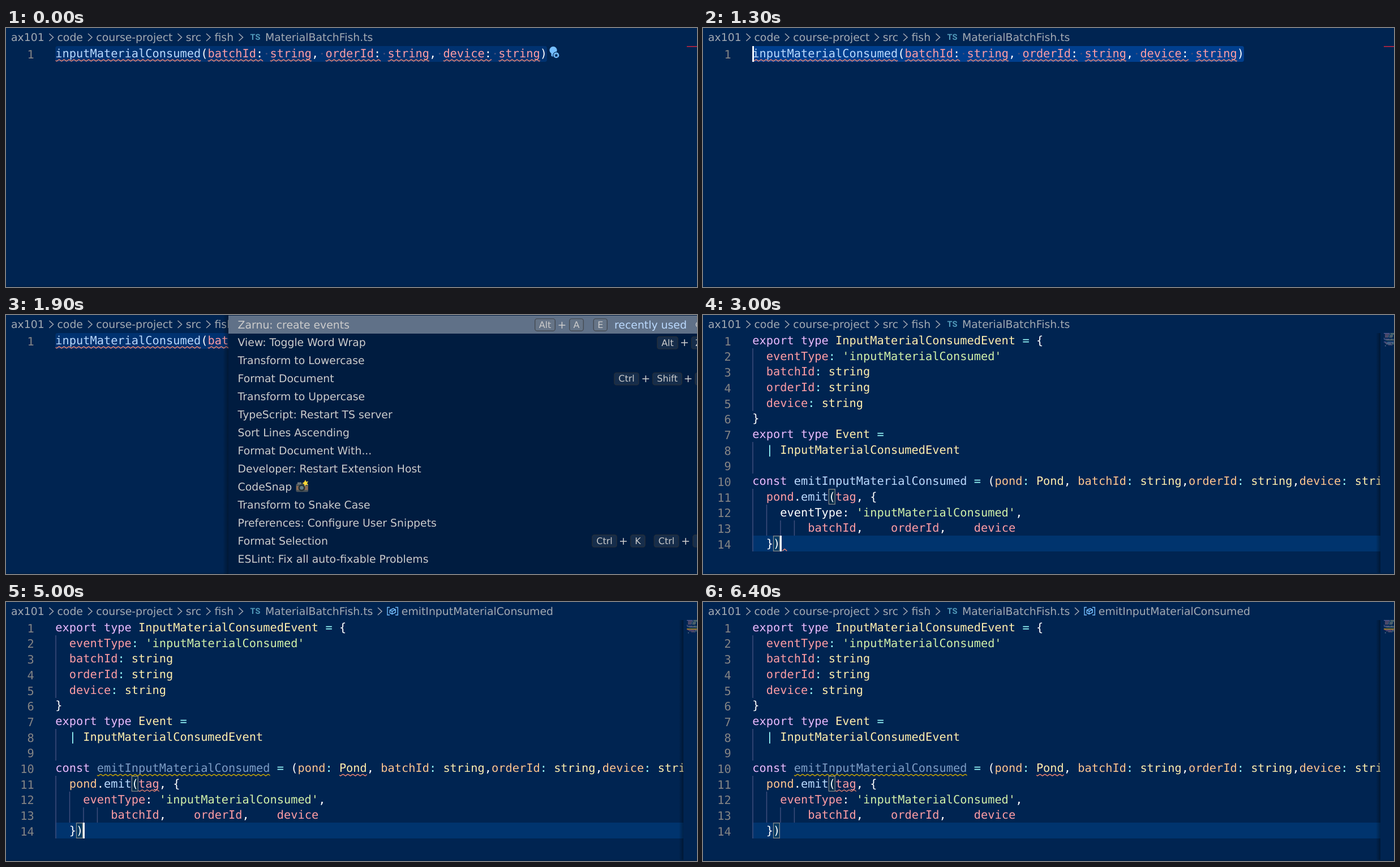
Write an HTML page that moves like this. It is 1221 px wide and 459 px high and loops after 6500 ms.

```html
<!DOCTYPE html>
<html lang="en">
<head>
<meta charset="utf-8">
<title>Editor command demo</title>
<style>
  html, body { margin: 0; width: 100%; height: 100%; overflow: hidden; background: #002451; }
  svg { display: block; }
  text { white-space: pre; text-rendering: geometricPrecision; }
  .code { font: 20.32px "DejaVu Sans Mono", monospace; }
  .ui { font: 18.85px "DejaVu Sans", sans-serif; }
  .key { font: 16px "DejaVu Sans", sans-serif; text-anchor: middle; }
  .file { font: bold 14.5px Roboto, sans-serif; }
</style>
</head>
<body>
<svg id="stage" width="1221" height="459" viewBox="0 0 1221 459"></svg>
<script>
const LOOP = 6500;
const LEFT = 87.3, TOP = 31.5, CHAR = 12.234, LINE = 27.69, BOX = 28;
const ERROR = '#f48771', WARNING = '#cca700', CRUMB = '#a3aab3';
const COLORS = {
  k: '#ebbbff', y: '#ffeead', o: '#99ffff', w: '#ffffff', r: '#ff9da4',
  s: '#d1f1a9', f: '#bbdaff', p: '#ffc58f', d: '#7d9dc5'
};

const colX = col => LEFT + col * CHAR;
const rowY = row => TOP + row * LINE;
const boxY = row => Math.round(rowY(row));
const rect = (x, y, w, h, fill, extra = '') =>
  `<rect x="${x}" y="${y}" width="${w}" height="${h}" fill="${fill}" ${extra}/>`;
const path = (d, stroke, width = 1.45, extra = '') =>
  `<path d="${d}" fill="none" stroke="${stroke}" stroke-width="${width}" ${extra}/>`;
const text = (x, y, str, fill, cls = 'ui', extra = '') =>
  `<text x="${x}" y="${y}" fill="${fill}" class="${cls}" ${extra}>${str}</text>`;

// A line is a list of tokens split by "~"; the first letter of each is its colour.
function tokens(line) {
  let col = 0;
  return line.split('~').filter(Boolean).map(part => {
    const str = part.slice(1);
    const token = { col: col + str.length - str.trimStart().length, str: str.trim(), fill: COLORS[part[0]] };
    col += str.length;
    return token;
  });
}

const codeLine = (line, row) =>
  tokens(line).map(t => text(colX(t.col), Math.round(rowY(row) + 20.5), t.str, t.fill, 'code')).join('');

const lineNumber = row =>
  text(49.8, Math.round(rowY(row) + 22.3), row + 1, '#858585', 'code', 'text-anchor="end"');

function squiggle(row, col, length, color) {
  const end = length * CHAR, y = rowY(row) + 23.8;
  let d = `M0 2.2L2.2 3.6`;
  for (let x = 2.2; x < end; x += 8.71) d += `L${x + 4.35} .6L${x + 8.71} 3.6`;
  return `<svg x="${colX(col)}" y="${y}" width="${end}" height="4.4">${path(d, color, 1.3)}</svg>`;
}

const bracket = (row, col) =>
  rect(colX(col) + .5, boxY(row) + .7, CHAR - 1.4, BOX - 1.4, 'rgba(0,100,0,.1)', 'stroke="#888" stroke-width="1.3"');
const caret = (row, col) => rect(colX(col) - .2, boxY(row), 2.9, BOX, '#fff');
const activeRow = row => rect(LEFT, boxY(row), 1197 - LEFT, BOX, '#00346e');

function breadcrumbs(symbol) {
  const items = [[9, 'ax101'], [90.5, 'code'], [159.3, 'course-project'], [317.7, 'src'], [368.5, 'fish'], [458, 'MaterialBatchFish.ts']];
  const chevrons = [80, 148.5, 307, 357.5, 415];
  if (symbol) {
    items.push([698.8, 'emitInputMaterialConsumed']);
    chevrons.push(660.5);
  }
  return items.map(([x, str]) => text(x, 22.5, str, CRUMB)).join('') +
    chevrons.map(x => path(`M${x - 3.5} 10l7 6.5l-7 6.5`, CRUMB, 1.5)).join('') +
    text(431.6, 21.4, 'TS', '#519aba', 'file') +
    (symbol ? path('M678 9.5h-4v13.5h4M688 9.5h4.3v13.5h-4.3M678.3 14.5l6-3l4 2v5l-6 3l-4-2zl4 2l6-3M682.3 16.5v5', '#75beff', 1.4) : '');
}

const base = symbol => rect(0, 0, 1221, 459, '#002451') + breadcrumbs(symbol) +
  rect(0, 457, 1221, 2, '#000', 'opacity=".12"');

const CALL = 'finputMaterialConsumed~w(~rbatchId~w: ~rstring~w, ~rorderId~w: ~rstring~w, ~rdevice~w: ~rstring~w)';
const CALL_ERRORS = [[0, 21], [22, 8], [31, 6], [39, 8], [48, 6], [56, 7], [64, 6]];
const CALL_SPACES = [30, 38, 47, 55, 63];

const bulb = '<g fill="#75beff"><circle cx="967" cy="39.3" r="6.6"/><path d="M963.5 43h7v5.5q0 2-3.5 2t-3.5-2z"/>' +
  '<circle cx="972.3" cy="48.3" r="6.2" fill="#002451"/><circle cx="972.3" cy="48.3" r="5"/></g>' +
  '<path d="M972.3 45l1 2.3l2.4.2l-1.8 1.6l.6 2.4l-2.2-1.3l-2.2 1.3l.6-2.4l-1.8-1.6l2.4-.2z" fill="#002451"/>';

function callView({ selection, active, caretCol, showBulb }) {
  let out = base(false);
  if (active) out += activeRow(0) + bracket(0, 21) + bracket(0, 70);
  if (selection) {
    out += rect(LEFT, boxY(0), 71 * CHAR, BOX, selection, 'rx="4"') +
      CALL_SPACES.map(c => `<circle cx="${colX(c + .5)}" cy="45.5" r="1.5" fill="#404f7d"/>`).join('');
  }
  out += lineNumber(0) + codeLine(CALL, 0) +
    CALL_ERRORS.map(([col, length]) => squiggle(0, col, length, ERROR)).join('') +
    rect(1203, 32, 18, 1.6, '#c4263f');
  if (showBulb) out += bulb;
  if (caretCol !== undefined) out += caret(0, caretCol);
  return out;
}

const COMMANDS = ['Zarnu: create events', 'View: Toggle Word Wrap', 'Transform to Lowercase', 'Format Document',
  'Transform to Uppercase', 'TypeScript: Restart TS server', 'Sort Lines Ascending', 'Format Document With...',
  'Developer: Restart Extension Host', 'CodeSnap', 'Transform to Snake Case',
  'Preferences: Configure User Snippets', 'Format Selection', 'ESLint: Fix all auto-fixable Problems'];
// Row, left edge, width and label of each key cap; a width of 0 marks a plus sign.
const KEYS = [
  [0, 934, 37, 'Alt'], [0, 982.5, 0, '+'], [0, 995, 26, 'A'], [0, 1037.5, 25.5, 'E'],
  [1, 1150, 38, 'Alt'], [1, 1199, 0, '+'], [1, 1210.5, 26, 'Z'],
  [3, 1074, 45, 'Ctrl'], [3, 1130.5, 0, '+'], [3, 1142, 53, 'Shift'], [3, 1205.5, 0, '+'], [3, 1217, 26, 'I'],
  [12, 1035, 45, 'Ctrl'], [12, 1091, 0, '+'], [12, 1103, 27, 'K'], [12, 1144.5, 45, 'Ctrl'], [12, 1201, 0, '+'], [12, 1213, 26, 'F']
];

const camera = rect(512.5, 299, 21.5, 14.5, '#4b5358', 'rx="2"') + rect(515, 296.5, 7, 4, '#6b7479') +
  rect(513, 303, 20.5, 7, '#8a6a55') +
  '<circle cx="522.5" cy="306.3" r="6" fill="#263238"/><circle cx="522.5" cy="306.3" r="3.3" fill="#617d8b"/>' +
  '<path d="M529 292l1.4 3.4l3.8-.6l-2.2 3.2l2 3.4l-3.8-.6l-2.5 2.8l-.7-3.9l-3.6-1.6l3.4-1.8z" fill="#fdd835"/>';

function paletteView() {
  const middle = row => 17 + row * 31.93;
  const keyCap = ([row, x, w, label]) => {
    const y = middle(row);
    if (!w) return text(x, y + 6.5, label, '#ccc', 'ui', 'text-anchor="middle"');
    return rect(x + .7, y - 10.4, w - 1.4, 21.6, 'rgba(128,128,128,.17)', 'rx="4" stroke="rgba(51,51,51,.6)" stroke-width="1.45"') +
      text(x + w / 2, y + 5.6, label, '#ccc', 'key');
  };
  return callView({ selection: '#003270' }) +
    rect(383, 0, 10, 459, 'url(#shade)') + rect(393, 0, 828, 459, '#001c40') +
    rect(393, 1, 828, 32, '#607188') +
    COMMANDS.map((str, row) => text(409.6, middle(row) + 6.5, str, '#ccc')).join('') +
    KEYS.map(keyCap).join('') + text(1075, 23.5, 'recently used', '#bbdaff') +
    '<circle cx="1224" cy="17" r="4.6" fill="none" stroke="#ccc" stroke-width="1.5"/>' + camera;
}

const sourceLines = checked => [
  'kexport type ~yInputMaterialConsumedEvent~o = ~w{',
  "r  eventType~o: ~s'inputMaterialConsumed'",
  'r  batchId~o: ~ystring',
  'r  orderId~o: ~ystring',
  'r  device~o: ~ystring',
  'w}',
  'kexport type ~yEvent~o =',
  'o  | ~yInputMaterialConsumedEvent',
  '',
  `kconst ~${checked ? 'd' : 'f'}emitInputMaterialConsumed~o = ~w(~ppond~o: ~yPond~w, ~pbatchId~o: ~ystring~w,~porderId~o: ~ystring~w,~pdevice~o: ~ystring`,
  `${checked ? 'p' : 'r'}  pond~w.~femit~w(~rtag~w, {`,
  `${checked ? 'r' : 'w'}    eventType~w: ~s'inputMaterialConsumed'~w,`,
  'r        batchId~w,    ~rorderId~w,    ~rdevice',
  'w  })'
];
// Column, first row, last row.
const GUIDES = [[0, 1, 4], [0, 7, 8], [0, 10, 13], [2, 11, 12], [4, 12, 12], [6, 12, 12]];

function minimap(lines, checked) {
  const bars = lines.map((line, row) => tokens(line).map(t => {
    const x = 1203 + t.col * .95;
    return x < 1221 ? rect(x, 32 + row * 1.7, Math.min(t.str.length * .95, 1221 - x), 1.1, t.fill, 'opacity=".45"') : '';
  }).join('')).join('');
  return bars + (checked ? rect(1203, 47, 18, 1.5, WARNING, 'opacity=".8"') + rect(1203, 48.8, 18, 1.2, '#c4263f', 'opacity=".4"') : '');
}

const pointer = ([x, y]) => {
  const d = `M${x + 1} ${y + 1}h5M${x + 3.5} ${y + 1}v15M${x + 1} ${y + 16}h5`;
  return path(d, '#fff', 2) + path(d, '#000', 1);
};

function codeView({ checked = true, blink, mouse }) {
  const lines = sourceLines(checked);
  let out = base(checked) + activeRow(13) + bracket(10, 11) + bracket(13, 3) +
    GUIDES.map(([col, from, to]) => rect(colX(col), boxY(from), 1.45, boxY(to + 1) - boxY(from), '#404f7d')).join('') +
    lines.map((line, row) => lineNumber(row) + codeLine(line, row)).join('');
  out += checked
    ? squiggle(9, 6, 25, WARNING) + squiggle(9, 41, 4, ERROR) + squiggle(10, 12, 3, ERROR)
    : path('M140 418.3l4.3-3.6l4 3.6', ERROR, 1.3);
  out += rect(1197, 32, 24, 425, '#002451') + rect(1189, 32, 8, 425, 'url(#shade)') + minimap(lines, checked);
  if (blink) out += caret(13, 4);
  if (mouse) out += pointer(mouse);
  return out;
}

const MIDDLE = [586, 266], GUTTER = [39, 27];
const STEPS = [
  [0, callView, { selection: '#003270', showBulb: true }],
  [300, callView, { active: true, caretCol: 71, showBulb: true }],
  [500, callView, { active: true, caretCol: 71 }],
  [800, callView, { active: true }],
  [1300, callView, { selection: '#003f8e', caretCol: 0 }],
  [1800, callView, { selection: '#003f8e' }],
  [1900, paletteView],
  [3000, codeView, { checked: false, blink: true }],
  [3200, codeView, { blink: true }],
  [3400, codeView, {}],
  [3700, codeView, { mouse: MIDDLE }],
  [3900, codeView, { blink: true, mouse: MIDDLE }],
  [4000, codeView, { blink: true, mouse: GUTTER }],
  [4200, codeView, { blink: true }],
  [4400, codeView, {}],
  [5000, codeView, { blink: true }],
  [5400, codeView, {}],
  [5900, codeView, { blink: true }],
  [6400, codeView, {}]
];

const DEFS = '<defs><linearGradient id="shade"><stop offset="0" stop-opacity="0"/><stop offset="1" stop-opacity=".35"/></linearGradient></defs>';
const stage = document.getElementById('stage');
const start = performance.now();
let shown;

function draw() {
  const time = (performance.now() - start) % LOOP;
  const step = STEPS.findLast(([at]) => at <= time);
  if (step !== shown) {
    shown = step;
    stage.innerHTML = DEFS + step[1](step[2]);
  }
  requestAnimationFrame(draw);
}
draw();
</script>
</body>
</html>
```
